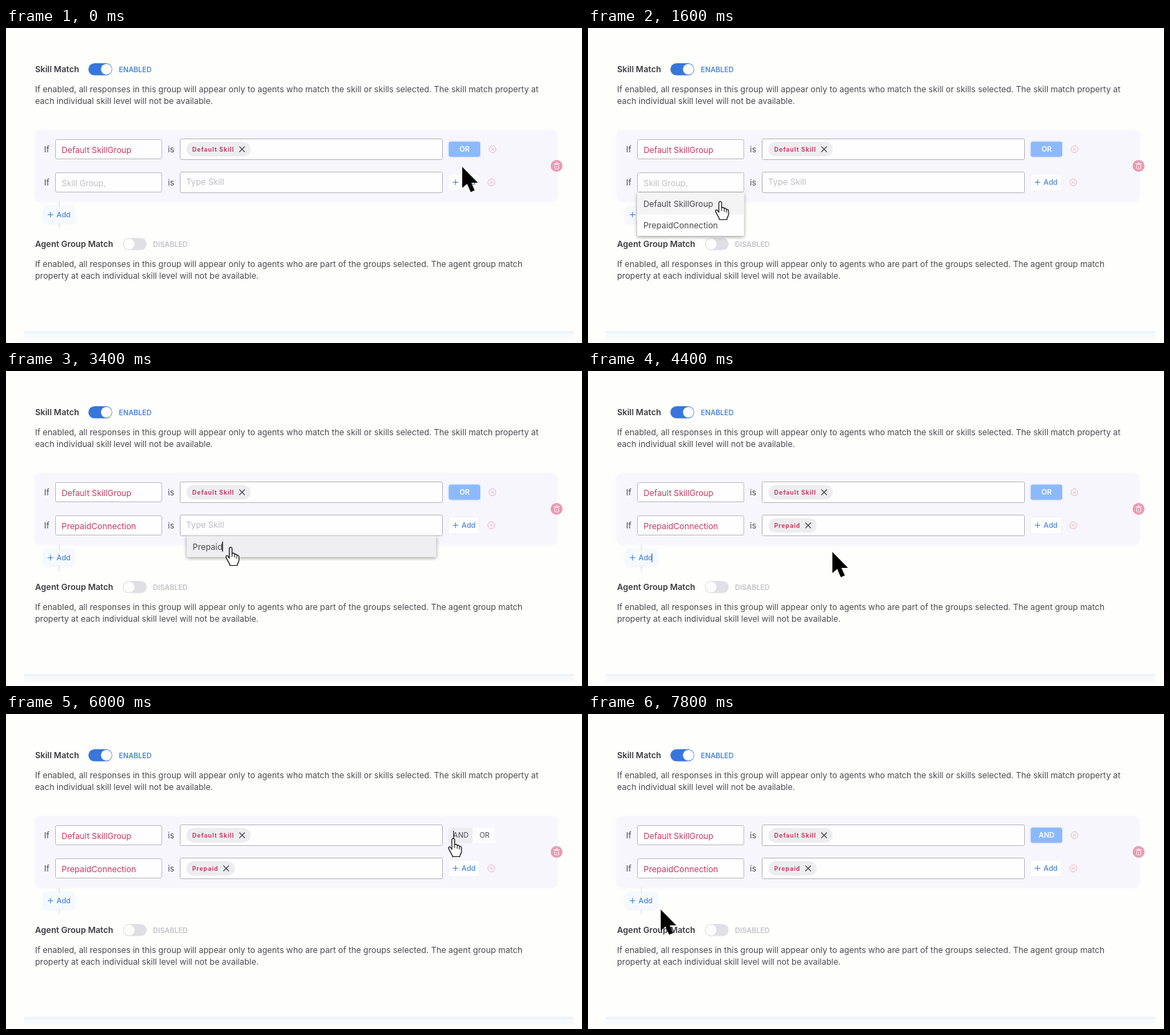
Recreate the animation shown at these times as an HTML page with a canvas. Size 832x456 px, loop 8000 ms.

```html
<!DOCTYPE html>
<html lang="en">
<head>
<meta charset="utf-8">
<title>Skill match rules</title>
<style>
html, body { margin: 0; width: 100%; height: 100%; overflow: hidden; background: #fefefd; }
canvas { display: block; width: 832px; height: 456px; }
</style>
</head>
<body>
<canvas id="stage" width="832" height="456"></canvas>
<script>
const ctx = document.getElementById('stage').getContext('2d');
const LOOP = 8000, STEP = 200;
const INK = '#4c4c50', RED = '#cb3a62', BLUE = '#4a86d8', HINT = '#bfbfc4', PINK = '#f0b4c3';

// Pointer path: time, x, y, shape from that time on
const path = [
  [0, 659, 202, 'arrow'],
  [1000, 190, 224, 'hand'],
  [1400, 190, 224, 'hand'],
  [1600, 191, 251.5, 'hand'],
  [1800, 191, 271, 'hand'],
  [2000, 191, 271, 'arrow'],
  [2200, 192, 281, 'arrow'],
  [2400, 204, 268, 'arrow'],
  [3000, 322, 226, 'hand'],
  [3200, 324, 238, 'hand'],
  [3400, 324.5, 255.5, 'hand'],
  [3600, 327, 262, 'arrow'],
  [3800, 333, 271, 'arrow'],
  [4400, 353, 263, 'arrow'],
  [5400, 655, 178, 'hand'],
  [6000, 646, 180.5, 'hand'],
  [6200, 646, 180.5, 'hand'],
  [6400, 640, 188, 'arrow'],
  [7800, 105, 284, 'arrow']
];

function text(str, x, y, color = INK, size = 11.97, weight = 400, spacing = 0) {
  ctx.font = `${weight} ${size}px Inter, sans-serif`;
  ctx.letterSpacing = spacing + 'px';
  ctx.fillStyle = color;
  ctx.fillText(str, x, y);
}

function box(x, y, w, h, r, fill, stroke) {
  ctx.beginPath();
  ctx.roundRect(x, y, w, h, r);
  if (fill) { ctx.fillStyle = fill; ctx.fill(); }
  if (stroke) { ctx.strokeStyle = stroke; ctx.lineWidth = 1; ctx.stroke(); }
}

function shadowBox(x, y, w, h, r, fill, shadow, blur, dy = 0) {
  ctx.save();
  ctx.shadowColor = shadow;
  ctx.shadowBlur = blur;
  ctx.shadowOffsetY = dy;
  box(x, y, w, h, r, fill);
  ctx.restore();
}

function disc(x, y, r, fill, stroke) {
  box(x - r, y - r, 2 * r, 2 * r, r, fill, stroke);
}

function line(x1, y1, x2, y2, color, width = 1) {
  ctx.beginPath();
  ctx.moveTo(x1, y1);
  ctx.lineTo(x2, y2);
  ctx.strokeStyle = color;
  ctx.lineWidth = width;
  ctx.stroke();
}

function cross(x, y, r, color, width) {
  line(x - r, y - r, x + r, y + r, color, width);
  line(x - r, y + r, x + r, y - r, color, width);
}

function plusLabel(x, y) {
  line(x - 4, y, x + 4, y, BLUE, 1.1);
  line(x, y - 4, x, y + 4, BLUE, 1.1);
  text('Add', x + 8.8, y + 3.9, BLUE, 10.4, 500);
}

function toggle(x, y, on) {
  box(x, y, 34.5, 17.5, 9, on ? '#3876dc' : '#dfdfe5');
  disc(on ? x + 26 : x + 9, y + 8.7, 7.8, '#fdfdfe');
}

function chip(label, y, w) {
  box(260.5, y - 10.5, w, 21, 10.5, '#ededf0');
  text(label, 269, y + 3.2, RED, 8.5, 700, 0.85);
  cross(260 + w - 12, y, 4, '#47474c', 1.1);
}

function removeIcon(x, y) {
  disc(x, y, 5, null, PINK);
  cross(x, y, 2, PINK, 1);
}

function trash() {
  disc(795.3, 199.5, 8.6, '#ea9bb1');
  box(792.5, 197.5, 6, 6.5, 1, null, '#fbe9ee');
  line(791, 196.5, 800, 196.5, '#fbe9ee');
  line(794, 194.8, 797, 194.8, '#fbe9ee');
  line(795.5, 199.5, 795.5, 202.5, '#fbe9ee', 0.8);
}

function sections() {
  text('Skill Match', 42, 64.3, '#3c3c40', 12, 600);
  toggle(119, 51, true);
  text('ENABLED', 163, 63.8, BLUE, 10.2, 600);
  text('If enabled, all responses in this group will appear only to agents who match the skill or skills selected. The skill match property at', 42, 93);
  text('each individual skill level will not be available.', 42, 110);

  text('Agent Group Match', 42, 317.4, '#3c3c40', 12, 600);
  toggle(168.7, 304, false);
  text('DISABLED', 212.3, 316.8, '#c2c2c8', 10.2, 600);
  text('If enabled, all responses in this group will appear only to agents who are part of the groups selected. The agent group match', 42, 346);
  text('property at each individual skill level will not be available.', 42, 363);

  box(26, 437.5, 794, 12.5, 2, '#f6fafc');
  box(26, 439, 794, 3, 0, '#edf3f8');
}

function rule(y) {
  text('If', 55, y + 4.2);
  box(71.5, y - 14, 153.5, 28, 2, '#fefefe', '#bcbcc2');
  text('is', 233.8, y + 4.2);
  box(251.5, y - 15, 379, 30, 2, '#fefefe', '#b7b7be');
}

function rules(t) {
  shadowBox(41.5, 148, 755, 103.5, 8, '#f7f6fd', 'rgba(246,245,253,.9)', 4);
  rule(175.5);
  rule(223.5);
  text('Default SkillGroup', 80.3, 181, RED, 11.85);
  chip('Default Skill', 175.5, 93);

  if (t < 2200) text('Skill Group,', 80.3, 228.5, HINT, 11.85);
  else text('PrepaidConnection', 80.3, 229, RED, 11.9);

  if (t < 3600) text('Type Skill', 260.3, 227.3, HINT, 12.1);
  else chip('Prepaid', 223.5, 70);

  if (t >= 5800 && t < 6200) {
    box(639, 164.5, 68, 22.5, 3, '#fcfcfe');
    box(639, 164.5, 35, 22.5, 3, '#ededf1');
    text('AND', 645.8, 179.2, INK, 10.3);
    text('OR', 684, 179.2, INK, 10.3);
  } else {
    const and = t >= 6200;
    shadowBox(639.5, 164.5, 45.5, 22, 3, '#8cb9fc', 'rgba(140,185,254,.35)', 3);
    text(and ? 'AND' : 'OR', and ? 651 : 655, 179.2, '#fff', 10.3, 600);
    removeIcon(702.7, 175.5);
  }

  shadowBox(639.5, 212, 44, 23, 3, '#fefeff', 'rgba(120,130,180,.08)', 3);
  plusLabel(649.3, 223.3);
  removeIcon(701, 223.5);
  trash();

  line(77, 251, 77, 290, '#d8dce8');
  shadowBox(54.5, 259, 44, 23.5, 4, '#f5f9fe', 'rgba(180,205,240,.35)', 4);
  plusLabel(64.3, 270.3);
}

function menus(t) {
  if (t >= 1200 && t < 2200) {
    shadowBox(71, 238.5, 154.5, 62.5, 2, '#fefefe', 'rgba(0,0,0,.4)', 5, 1.5);
    if (t >= 1600) box(71, t < 1800 ? 239 : 270, 154.5, 31, 0, '#f4f4f5');
    text('Default SkillGroup', 80, 258.8, INK, 11.85);
    text('PrepaidConnection', 80, 290.3, INK, 11.9);
  }
  if (t >= 3200 && t < 3600) {
    shadowBox(261, 238.5, 360.5, 31, 2, '#efeff2', 'rgba(0,0,0,.4)', 5, 1.5);
    text('Prepaid', 269.5, 258.6);
  }
}

function caret(t) {
  if (t % 1000 >= 500) return;
  if (t >= 2200 && t < 3200) line(189.5, 217, 189.5, 231, RED, 1.2);
  else if (t >= 3400 && t < 3600) line(312.7, 247, 312.7, 261.5, '#222', 1.4);
  else if (t >= 3600 && t < 5800) line(92.5, 264, 92.5, 277, BLUE, 1.3);
  else if (t >= 5800 && t < 6200) line(646.5, 169, 646.5, 182, '#333', 1.2);
}

const arrow = new Path2D('M0 -1V29.5L7 23.5L12.2 35.5L18 33L13 22H22.5Z');
const hand = new Path2D('M-2 1.5C-2 -1 2 -1 2 1.5V9C3 7.5 5.5 8 5.8 10' +
  'C7 9 9 9.5 9 11.5C10.5 10.5 12 11.5 12 13.5V18C12 21 10 22 9.5 26H-1' +
  'C-1.5 22 -5 19 -6.5 14.5C-7.5 11.5 -4.5 11 -3.2 13.5L-2 15.5Z');

function pointer(t) {
  let i = path.length - 1;
  while (path[i][0] > t) i--;
  const [t0, x0, y0, shape] = path[i];
  const [t1, x1, y1] = path[i + 1] || [t0 + 1, x0, y0];
  const p = (t - t0) / (t1 - t0);
  const ease = p * p * (3 - 2 * p);
  ctx.save();
  ctx.translate(x0 + (x1 - x0) * ease, y0 + (y1 - y0) * ease);
  if (shape === 'arrow') {
    ctx.fillStyle = '#000';
    ctx.fill(arrow);
  } else {
    ctx.fillStyle = '#fff';
    ctx.strokeStyle = '#111';
    ctx.lineWidth = 1.2;
    ctx.lineJoin = 'round';
    ctx.fill(hand);
    ctx.stroke(hand);
    for (const [x, y] of [[2, 9], [5.8, 10], [9, 11.5]]) line(x, y, x, y + 4.5, '#111');
  }
  ctx.restore();
}

function draw(t) {
  ctx.fillStyle = '#fefefd';
  ctx.fillRect(0, 0, 832, 456);
  sections();
  rules(t);
  menus(t);
  caret(t);
  pointer(t);
}

const start = performance.now();
function tick() {
  const t = (performance.now() - start) % LOOP;
  draw(Math.floor(t / STEP) * STEP);
  requestAnimationFrame(tick);
}
tick();
</script>
</body>
</html>
```
